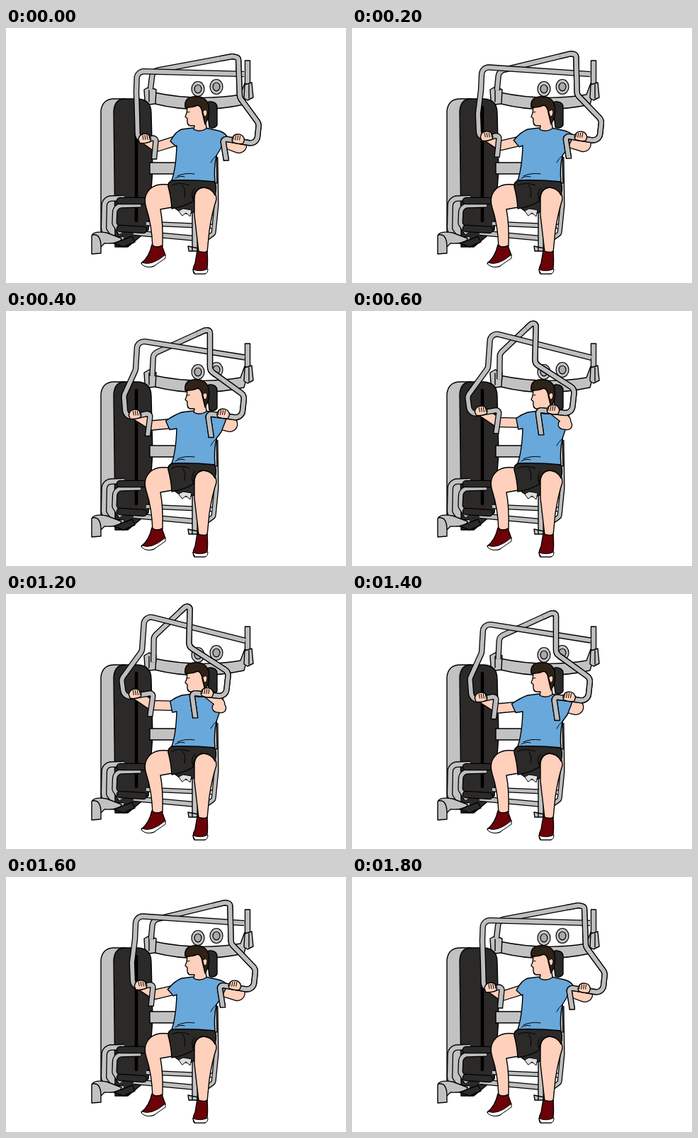
Write an HTML page with a canvas that moves like this. It is 480x360 px and loops after 2 s.

```html
<!DOCTYPE html>
<html>
<head>
<meta charset="utf-8">
<style>
html, body { margin: 0; width: 100%; height: 100%; overflow: hidden; background: #fff; }
canvas { display: block; }
</style>
</head>
<body>
<canvas id="stage" width="480" height="360"></canvas>
<script>
const ctx = document.getElementById('stage').getContext('2d');
const STEEL = '#bebebe', PANEL = '#c2c2c2', DARK = '#2b2a29', SKIN = '#ffd0bb';
const SHIRT = '#69a8da', HAIR = '#2f2216', SHOE = '#6c0207', INK = '#000';

// The two ends of the movement; everything else is interpolated.
const open = {
  left: [[336, 65], [185, 61], [184, 90], [185, 122], [186, 162], [212, 154], [209, 185]],
  right: [[204, 86], [207, 61], [320, 40], [328, 42], [330, 98], [357, 135], [354, 164], [306, 156], [311, 187]],
  elbows: [[212, 168], [340, 174]],
  cuffs: [[232, 160], [241, 168], [312, 153], [302, 172]]
};
const closed = {
  left: [[338, 66], [202, 26], [198, 80], [164, 121], [168, 145], [212, 138], [207, 172]],
  right: [[209, 98], [209, 60], [241, 15], [248, 11], [246, 70], [303, 107], [299, 143], [251, 138], [256, 174]],
  elbows: [[206, 155], [302, 160]],
  cuffs: [[237, 150], [239, 167], [303, 149], [298, 169]]
};
const SHOULDERS = [[244, 158], [304, 161]];

const mix = (a, b, k) => Array.isArray(a) ? a.map((v, i) => mix(v, b[i], k)) : a + (b - a) * k;
const shift = ([x, y], dx, dy) => [x + dx, y + dy];

// Both grips swing outwards along an arc on their way.
function poseAt(k) {
  const bow = 4 * k * (1 - k);
  const swing = (points, side, from) =>
    points.map((p, i) => i < from ? p : shift(p, side * 8 * bow, -2 * bow));
  const left = swing(mix(open.left, closed.left, k), -1, 1);
  const right = swing(mix(open.right, closed.right, k), 0.8, 5);
  const elbows = mix(open.elbows, closed.elbows, k).map((p, i) => shift(p, (i ? 9 : -3) * bow, 0));
  const cuffs = mix(open.cuffs, closed.cuffs, k).map((p, i) => shift(p, (i < 2 ? -9 : 4) * bow, 0));
  const hands = [left, right].map((bar, i) => shift(mix(...bar.slice(-3, -1), 0.38 + i * 0.17), 0, -2.5));
  return { left, right, elbows, cuffs, hands, forward: k > 0.8 };
}

function shape(d, fill, line = 1.4) {
  const path = new Path2D(d);
  if (fill) { ctx.fillStyle = fill; ctx.fill(path); }
  if (line) { ctx.strokeStyle = INK; ctx.lineWidth = line; ctx.stroke(path); }
}

function tube(points, width = 5.8, color = STEEL, radius = 10, cap = 'butt') {
  const gap = (p, q) => Math.hypot(p[0] - q[0], p[1] - q[1]);
  ctx.beginPath();
  ctx.moveTo(...points[0]);
  for (let i = 1; i < points.length - 1; i++) {
    const [a, b, c] = points.slice(i - 1, i + 2);
    const limit = Math.min(gap(a, b), gap(b, c)) / 2;
    const corner = i === points.length - 2 ? Math.min(radius, 4) : radius;
    ctx.arcTo(...b, ...c, Math.min(corner, limit));
  }
  ctx.lineTo(...points[points.length - 1]);
  ctx.lineCap = cap;
  for (const [w, c] of [[width + 2.6, INK], [width, color]]) {
    ctx.lineWidth = w;
    ctx.strokeStyle = c;
    ctx.stroke();
  }
  ctx.lineCap = 'round';
}

function closeEnd([x, y]) {
  shape(`M${x - 3.5} ${y}h7`);
}

function disc(x, y) {
  for (const scale of [1, 0.55]) {
    ctx.beginPath();
    ctx.ellipse(x, y, 9 * scale, 10.5 * scale, 0, 0, 7);
    ctx.fillStyle = scale < 1 ? '#aaa' : PANEL;
    ctx.fill();
    ctx.strokeStyle = INK;
    ctx.lineWidth = 1.2;
    ctx.stroke();
  }
}

function rearFrame() {
  tube([[341, 46], [341, 84]]);
  closeEnd([341, 46]);
  disc(271, 86);
  disc(297, 83);
  shape('M209 91Q270 104 331 94L337 78L343 82L336 108Q270 122 210 107Z', PANEL);
  shape('M195 87L202 83L212 87L211 107L202 108L196 102ZM202 88V104', PANEL);
  shape('M337 80L347 77L349 98L341 102L336 99ZM343 80V99', PANEL);
}

function tower() {
  shape('M134 288V117Q136 100 153 100H168L178 292L152 302Z', PANEL);
  shape('M154 290L152 118Q153 100 168 100H186Q205 101 205 120L207 200L201 285L172 309H154Z', DARK);
  tube([[184, 112], [184, 272]], 2, INK, 0, 'round');
}

function base() {
  shape('M203 190H240V206H203Z', PANEL);
  tube([[296, 182], [297, 250], [293, 290], [278, 301]], 4.5);
  tube([[198, 276], [291, 280]], 4.5);
  tube([[180, 289], [278, 298]], 5.5);
  shape('M263 252H271L270 315H263ZM257 308L271 311V315H258Z', PANEL);
  tube([[167, 240], [139, 241], [138, 285], [148, 299], [166, 298]], 6, PANEL);
  tube([[190, 250], [154, 251], [153, 276], [162, 290]], 5, STEEL);
  tube([[161, 244], [193, 244]], 8, DARK, 0, 'round');
  tube([[161, 283], [194, 285]], 8, DARK, 0, 'round');
  shape('M121 293Q124 286 142 289L163 297Q163 305 139 304L134 309V318L121 319ZM122 292Q134 290 134 309', PANEL);
  shape('M152 304L178 294L182 302L166 309Z', DARK);
}

function seat() {
  shape('M283 108Q284 103 290 104Q298 105 298 112V137Q294 143 287 140Z', DARK);
  shape('M291 162L297 164L298 219L291 218Z', PANEL);
  shape('M230 240L268 232V258Q255 268 238 254Z', DARK);
  shape('M244 258L250 255L262 257L260 266L254 261L249 265Z', '#ddd', 1);
}

function shoe(d, sole) {
  shape(d, SHOE);
  shape(sole, '#fff', 1);
}

function legs() {
  shape('M233 222Q208 217 199 233Q194 241 198 254Q206 278 207 310L221 308Q222 276 218 256L235 253Z', SKIN);
  shape('M266 240Q267 226 280 225Q297 227 297 242Q291 260 287 286L284 317L272 316Q269 290 266 264Z', SKIN);
  shape('M237 214Q228 217 229 224Q233 238 234 255Q250 253 265 244Q264 229 277 225Q290 225 295 236Q299 220 292 215Z', DARK);
  shape('M234 222Q244 217 259 222M265 244Q259 233 267 226M249 222Q255 228 252 239', null, 1);
  shoe('M206 306Q213 312 220 307L225 321L209 336Q199 340 191 332Q202 324 206 306Z',
    'M192 331Q205 337 225 320V325L209 336Q199 340 192 334Z');
  shoe('M270 314Q278 319 284 315Q286 343 281 347H266Q262 342 267 332Z',
    'M264 341Q275 345 285 340Q285 347 280 347H267Z');
}

function head() {
  shape('M255 108Q257 118 253 125L256 128Q255 137 260 138H266L265 143Q273 148 283 142L281 123V110Z', SKIN);
  shape('M253 112Q251 99 264 97Q282 95 286 109Q288 122 284 130L281 136L277 119Q276 111 271 109Q262 113 253 112Z', HAIR);
  shape('M278 118Q282 113 284 118Q284 125 280 125Z', SKIN, 1);
  shape('M256 119l3 -.5', null, 1);
}

function arm({ elbows, hands }, side) {
  tube([SHOULDERS[side], elbows[side], hands[side]], 12, SKIN, 5, 'round');
}

function shirt([a, b, c, d]) {
  shape(`M264 141Q273 146 282 141L300 145Q308 147 ${c}L${d}L297 180Q293 200 295 217
    Q265 214 234 215Q240 198 241 166L${b}L${a}Q239 146 248 143Z`, SHIRT);
  shape('M242 209Q252 204 266 206M239 212Q246 208 252 210M289 190Q292 184 297 180', null, 1);
}

function hand([x, y], flip) {
  ctx.save();
  ctx.translate(x, y);
  ctx.scale(flip, 1);
  shape('M-9 1Q-8 -6 -2 -7Q6 -8 8 -2Q10 4 5 5Q-1 7 -7 6Z', SKIN);
  for (let finger = -3; finger < 7; finger += 3) shape(`M${finger} -5l1 6`, null, 1);
  ctx.restore();
}

function levers({ left, right }) {
  tube(right);
  tube(left);
  // The front half of the right lever passes over the crossbar.
  tube([mix(right[1], right[2], 0.85), ...right.slice(2)]);
  closeEnd(left[left.length - 1]);
  closeEnd(right[right.length - 1]);
}

function draw(pose) {
  ctx.fillStyle = '#fff';
  ctx.fillRect(0, 0, 480, 360);
  ctx.lineJoin = ctx.lineCap = 'round';
  rearFrame();
  tower();
  base();
  seat();
  legs();
  arm(pose, 0);
  if (!pose.forward) arm(pose, 1);
  shirt(pose.cuffs);
  head();
  if (pose.forward) arm(pose, 1);
  levers(pose);
  pose.hands.forEach((p, i) => hand(p, i ? -1 : 1));
}

// Ten held steps per loop: five in, five back, eased like a half cosine.
function frame() {
  const step = Math.floor(performance.now() % 2000 / 200);
  const phase = Math.min(step, 9 - step) / 4;
  draw(poseAt((1 - Math.cos(Math.PI * phase)) / 2));
  requestAnimationFrame(frame);
}
frame();
</script>
</body>
</html>
```
